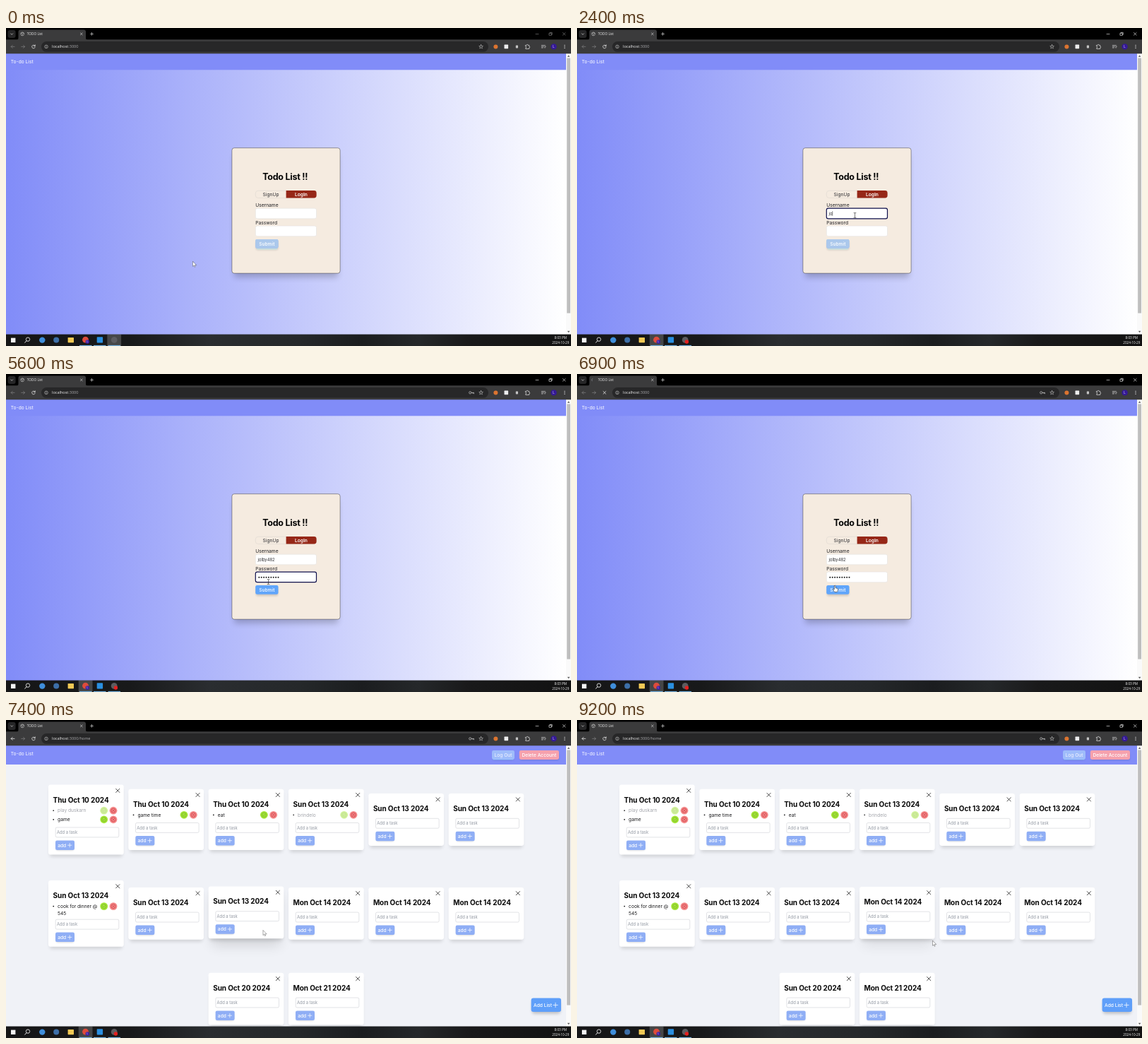
Write an HTML page that moves like this. It is 800 px wide and 450 px high and loops after 9300 ms.

```html
<!DOCTYPE html>
<html lang="en">
<head>
<meta charset="utf-8">
<title>Todo list</title>
<style>
  html, body { margin: 0; width: 100%; height: 100%; overflow: hidden; background: #000; }
  svg { display: block; width: 800px; height: 450px; }
  text { font: 400 6.67px Inter, sans-serif; white-space: pre; }
  .ui { font-family: "Open Sans", "Noto Sans", sans-serif; }
  .line { fill: none; stroke-linecap: round; stroke-linejoin: round; }
</style>
</head>
<body>
<svg id="stage" viewBox="0 0 800 450" xmlns="http://www.w3.org/2000/svg">
  <defs>
    <linearGradient id="sky"><stop stop-color="#818cf8"/><stop offset="1" stop-color="#fff"/></linearGradient>
    <linearGradient id="dock">
      <stop stop-color="#161617"/><stop offset=".22" stop-color="#18191a"/>
      <stop offset=".36" stop-color="#2a2d30"/><stop offset=".52" stop-color="#25282a"/>
      <stop offset=".63" stop-color="#1b1d1f"/><stop offset=".73" stop-color="#25282a"/>
      <stop offset=".82" stop-color="#19191a"/><stop offset="1" stop-color="#121212"/>
    </linearGradient>
  </defs>
</svg>
<script>
const LOOP = 9300, STEP = 100;
const CLICK = 900, TAB = 3700, SUBMIT = 6400, LOAD = 6500, HOME = 7000, READY = 7300;
const USER = "jolby482";
const USER_KEYS = [2200, 2400, 2500, 2700, 2800, 3000, 3200, 3300];
const PASS_KEYS = [3900, 4200, 4300, 4400, 4500, 4600, 4700, 4900, 5000];
const PATH = [
  [0, 264.5, 330.5], [100, 264.5, 330.5], [800, 393.5, 265], [4800, 393.5, 265],
  [5100, 428, 302], [5300, 424, 298], [5800, 343, 292], [6300, 365, 299.5],
  [7000, 365, 299.5], [8200, 361, 293], [9050, 495, 311], [9200, 503.5, 312.5], [LOOP, 503.5, 312.5]
];

const stage = document.getElementById("stage");

function el(tag, parent, attrs = {}, text) {
  const node = document.createElementNS("http://www.w3.org/2000/svg", tag);
  for (const k in attrs) node.setAttribute(k, attrs[k]);
  if (text !== undefined) node.textContent = text;
  parent.append(node);
  return node;
}
const group = (p, a) => el("g", p, a);
const box = (p, x, y, width, height, fill, rx = 0, more) => el("rect", p, { x, y, width, height, fill, rx, ...more });
const dot = (p, cx, cy, r, fill, more) => el("circle", p, { cx, cy, r, fill, ...more });
const line = (p, d, stroke, w = 0.7, more) => el("path", p, { d, stroke, "stroke-width": w, class: "line", ...more });
const cross = (p, x, y, r, c, w) => line(p, `M${x - r} ${y - r}l${2 * r} ${2 * r}m0 ${-2 * r}l${-2 * r} ${2 * r}`, c, w);
const plus = (p, x, y, r, c, w) => line(p, `M${x - r} ${y}h${2 * r}M${x} ${y - r}v${2 * r}`, c, w);
const label = (p, x, y, s, fill, css = "", more) => el("text", p, { x, y, fill, style: css, ...more }, s);
const centred = (p, x, y, s, fill, css) => label(p, x, y, s, fill, css, { "text-anchor": "middle" });
const blurred = (p, x, y, w, h, blur, alpha, rx = 3) =>
  box(p, x, y, w, h, "#000", rx, { style: `filter:blur(${blur}px)`, opacity: alpha });
const show = (node, on) => { node.style.display = on ? "" : "none"; };

// Login page
const login = group(stage);
box(login, 0, 36, 793, 398, "url(#sky)");
box(login, 0, 36, 793, 23.3, "#818cf8");
blurred(login, 323, 180, 147, 173, 4, 0.2);
box(login, 319.9, 169.7, 153.2, 177.4, "#f5ebe0", 3.4, { stroke: "#3c3a3c", "stroke-width": 0.5 });
centred(login, 395.2, 215.3, "Todo List !!", "#050505", "font-size:12.5px;font-weight:700;letter-spacing:-.02em");
box(login, 353.2, 230.2, 86.4, 10.3, "#f5ebe0", 4, { stroke: "#d8d2cc", "stroke-width": 0.5 });
el("path", login, { d: "M396.6 230h39.6a3.4 3.4 0 0 1 3.4 3.4v3.6a3.4 3.4 0 0 1-3.4 3.4h-39.6z", fill: "#962717" });
centred(login, 375, 237.6, "SignUp", "#2c2c30");
centred(login, 418, 237.6, "LogIn", "#fff", "font-weight:600");
label(login, 353.2, 252.8, "Username", "#1f1f22");
label(login, 353.2, 277.7, "Password", "#1f1f22");

function field(y) {
  const g = group(login);
  box(g, 353.3, y, 86.2, 14.6, "#fff", 2.5, { stroke: "#dedcda", "stroke-width": 0.5 });
  const ring = box(g, 353.3, y, 86.2, 14.6, "#fff", 2.4, { stroke: "#10104c", "stroke-width": 1.2 });
  return { g, ring };
}
const userField = field(255.2), passField = field(280.1);
const userText = label(login, 356.6, 264.5, "", "#2a2a2e", "font-size:5.83px");
const bullets = PASS_KEYS.map((_, i) => dot(login, 358.3 + i * 3.4, 287.8, 1, "#151515"));
const caret = box(login, 0, 0, 0.5, 6.6, "#000");
const submit = group(login);
blurred(submit, 354, 302, 31, 12, 1.5, 0.16, 2);
box(submit, 353.2, 299, 32.3, 12.8, "#60a5fa", 2.2);
const submitVeil = box(login, 353.2, 299, 32.3, 12.8, "#f5ebe0", 2.2);
const submitGlow = box(login, 355, 312.2, 29, 1.2, "#c5e6e8", 0.6);
centred(login, 369.3, 307.7, "Submit", "#fff", "font-weight:500");

// Home page
const home = group(stage);
box(home, 0, 36, 793, 398, "#f0f2f7");
box(home, 0, 36, 793, 27, "#818cf8");

function actions(x, w, x2, css) {
  const g = group(home);
  blurred(g, x + 1, 46, w - 2, 11, 1, 0.12, 2);
  box(g, x, 43, w, 13, "#9fbcfa", 2.4);
  line(g, `M${x + 2} 56h${w - 4}`, "#8fd0ff", 0.6);
  centred(g, x + w / 2, 51.8, "Log Out", "#e8ecfd", css);
  blurred(g, x2 + 1, 46, 782 - x2, 11, 1, 0.12, 2);
  box(g, x2, 43, 783 - x2, 13, "#f6a1ad", 2.4);
  centred(g, (x2 + 783) / 2, 51.8, "Delete Account", "#fff", css);
  return g;
}
const FALLBACK = "font-family:'Liberation Sans',Arial,sans-serif;font-weight:700";
const early = actions(689.5, 32, 728, FALLBACK);
const late = actions(688, 32, 726.8, "font-weight:500");

const cardLayer = group(home);
const cards = [];

function mark(g, x, y, color, ink, done) {
  const m = group(g, { opacity: done ? 0.5 : 1 });
  dot(m, x, y, 5.4, color);
  dot(m, x, y, 3.1, "none", { stroke: ink, "stroke-width": 0.6 });
  return m;
}

function card(col, top, title, tasks = []) {
  const x = 60 + col * 113.33, w = 106.7;
  const lines = tasks.map(t => t.text.split("\n").length);
  const extra = lines.reduce((sum, n) => sum + (n > 1 ? 20 : 12.6), 0);
  const h = 73.8 + extra;
  const g = group(cardLayer);
  blurred(g, x + 2, top + 5, w - 4, h - 2, 2.5, 0.13);
  const lifted = blurred(g, x + 5, top + 15, w - 10, h - 5, 9, 0.3);
  box(g, x, top, w, h, "#fff", 3.4);
  cross(g, x + 98.2, top + 8.3, 2.6, "#111", 0.75);
  label(g, x + 6.6, top + 24.9, title, "#080808", "font-size:10px;font-weight:700;letter-spacing:-.01em");
  let y = top + 36.6;
  tasks.forEach((t, i) => {
    dot(g, x + 7.2, y, 0.9, t.done ? "#333" : "#111");
    t.text.split("\n").forEach((s, n) => label(g, x + 13.1, y + 2.2 + n * 10, s, t.done ? "#a3a5ab" : "#1a1a1c"));
    const ok = mark(g, x + 78.7, y, "#a3e635", "#6fa32a", t.done);
    line(ok, `M${x + 77.3} ${y}l1 1.1 2-2.1`, "#6fa32a", 0.6);
    const del = mark(g, x + 92, y, "#f48a8a", "#c42b34");
    cross(del, x + 92, y, 1.2, "#c42b34", 0.6);
    y += lines[i] > 1 ? 20 : 12.6;
  });
  const b = top + extra;
  box(g, x + 10.2, b + 35.2, 89.6, 13.9, "#fff", 1.8, { stroke: "#c4c7cd", "stroke-width": 0.5 });
  label(g, x + 11.9, b + 44.2, "Add a task", "#9298a2", "font-size:5.83px");
  blurred(g, x + 11, b + 56, 25, 12, 1, 0.14, 2);
  box(g, x + 10, b + 53.6, 27, 13.5, "#8faef5", 2.2);
  label(g, x + 13.2, b + 62.7, "add", "#fff", "font-weight:500");
  plus(g, x + 30.2, b + 60.4, 2.7, "#fff", 0.7);
  cards.push({ g, lifted, x, top, w, h });
}

card(0, 91.6, "Thu Oct 10 2024", [{ text: "play duskarn", done: true }, { text: "game" }]);
card(1, 97.7, "Thu Oct 10 2024", [{ text: "game time" }]);
card(2, 97.7, "Thu Oct 10 2024", [{ text: "eat" }]);
card(3, 97.7, "Sun Oct 13 2024", [{ text: "brindelo", done: true }]);
card(4, 104.1, "Sun Oct 13 2024");
card(5, 104.1, "Sun Oct 13 2024");
card(0, 227, "Sun Oct 13 2024", [{ text: "cook for dinner @\n545" }]);
["Sun Oct 13 2024", "Sun Oct 13 2024", "Mon Oct 14 2024", "Mon Oct 14 2024", "Mon Oct 14 2024"]
  .forEach((title, i) => card(i + 1, 236.9, title));
card(2, 357.8, "Sun Oct 20 2024");
card(3, 357.8, "Mon Oct 21 2024");

blurred(home, 745, 398, 39.5, 17.5, 2, 0.22);
box(home, 743.6, 393.6, 42.4, 19.4, "#5f9ff9", 3);
label(home, 747, 405.7, "Add List", "#fff", "font-weight:500");
plus(home, 778, 403.4, 3.2, "#fff", 0.75);

label(stage, 6.8, 50.2, "To-do List", "#fff");

// Scrollbar
box(stage, 793, 36, 7, 398, "#fafafa");
box(stage, 794.2, 42.5, 4.8, 361, "#bebebe");
el("path", stage, { d: "M794.8 40.8l1.8-2.2 1.8 2.2zM794.8 428.7l1.8 2.2 1.8-2.2z", fill: "#555" });

// Browser frame
const GREY = "#c8c8c8";
box(stage, 0, 0, 800, 16.5, "#000");
box(stage, 0, 16.3, 800, 20, "#3b3b3c");
box(stage, 2.6, 3, 11, 11, "#262627", 3);
line(stage, "M6.7 7.9l1.5 1.5 1.5-1.5", "#e4e4e4", 0.7);
el("path", stage, { d: "M14.5 17q3 0 3-3V5.5q0-3 3-3H110q3 0 3 3V14q0 3 3 3z", fill: "#3b3b3c" });
const globe = group(stage);
dot(globe, 23.2, 8.4, 2.4, "none", { stroke: GREY, "stroke-width": 0.6 });
line(globe, "M21.2 7.4l1.8.6.4 1.4-1 1.2M23.2 6.2l1 1.2 1.2.2", GREY, 0.6);
const spinner = line(stage, "M23.2 6a2.4 2.4 0 0 1 2.4 2.4", "#8f9499", 0.6);
const tabTitle = label(stage, 29.8, 10.3, "", "#f0f0f0", "font-size:4.75px", { class: "ui" });
cross(stage, 106.8, 8.4, 1.4, "#e4e4e4", 0.6);
plus(stage, 121.5, 8.4, 2, "#e4e4e4", 0.65);
const controls = group(stage);
line(controls, "M750 8.6h4", "#fff", 0.6);
line(controls, "M769.3 7.3h3v3h-3zM770.2 7.2v-.9h3v3h-.8", "#fff", 0.6);
cross(controls, 790.2, 8.4, 1.9, "#fff", 0.6);

const back = line(stage, "M12 26.4H7.2m2-2l-2 2 2 2", "#fff", 0.75);
line(stage, "M21.8 26.4h4.8m-2-2l2 2-2 2", "#7c7c7e", 0.75);
const reload = line(stage, "M41 25.3a2.3 2.3 0 1 0 .2 1.9M41.2 23.8v1.7h-1.7", "#eee", 0.75);
const stop = cross(stage, 39, 26.4, 1.9, "#eee", 0.75);
box(stage, 50, 19, 633, 14.8, "#272728", 7.4);
dot(stage, 57, 26.4, 2.3, "none", { stroke: GREY, "stroke-width": 0.6 });
line(stage, "M57 26.2v1.3M57 25.1v.1", GREY, 0.6);
const url = label(stage, 65, 28.4, "", "#f2f2f2", "font-size:5.55px", { class: "ui" });
el("tspan", url, {}, "localhost");
const urlRest = el("tspan", url, { fill: "#a9a9ab" });
const key = group(stage);
dot(key, 657.2, 26.4, 1.6, "none", { stroke: GREY, "stroke-width": 0.7 });
line(key, "M658.9 26.4h3.6v1.4M661 26.4v1.2", GREY, 0.7);
const star = Array.from({ length: 10 }, (_, i) => {
  const a = i * Math.PI / 5, r = i % 2 ? 1.3 : 3;
  return `${672.6 + r * Math.sin(a)} ${26.5 - r * Math.cos(a)}`;
});
line(stage, `M${star.join("L")}z`, GREY, 0.55);
dot(stage, 693.4, 26.4, 3, "#dc7430");
box(stage, 705.5, 23.6, 5.6, 5.6, "#ededed", 0.6);
box(stage, 721.8, 24.4, 3.2, 4, "#c4c4c4", 0.6);
line(stage, "M735.8 24.4h1.5a1 1 0 0 1 2 0h1.4v1.6a1 1 0 0 1 0 2v1.5h-4.9v-1.6a1 1 0 0 0 0-2z", "#e4e4e4", 0.7);
line(stage, "M758.3 24.6h5M758.3 26.3h3M758.3 28h2M763 28.2v-2h1.3", "#e4e4e4", 0.65);
dot(stage, 775.6, 26.4, 4.2, "#351a96");
centred(stage, 775.6, 28, "L", "#e6defc", "font-size:4.4px");
[24.4, 26.4, 28.4].forEach(y => dot(stage, 791, y, 0.55, "#eee"));

// Taskbar
box(stage, 0, 433.5, 800, 16.5, "url(#dock)");
const slot = box(stage, 0, 433.5, 19.8, 16.5, "#fff", 0, { opacity: 0.2 });
box(stage, 7, 438.6, 6.4, 6.4, "#f4f4f4");
dot(stage, 31, 440.6, 2.7, "none", { stroke: "#fff", "stroke-width": 0.8 });
line(stage, "M29 442.7l-2.3 2.5", "#fff", 0.9);
dot(stage, 51.3, 441.6, 4.2, "#3f8edb");
dot(stage, 71.2, 441.6, 4, "#3d6fa8");
box(stage, 87.6, 438, 8.4, 7.2, "#f3c955", 0.6);
dot(stage, 112.5, 441.2, 4.4, "#dd4b3c");
dot(stage, 115.3, 444, 2.7, "#3c1fa5");
centred(stage, 115.3, 445.2, "L", "#fff", "font-size:3.2px");
box(stage, 128.7, 437.2, 8.4, 8.4, "#2a8fe0", 0.8);
dot(stage, 153.2, 441.4, 4.4, "#5c5c60");
const rec = dot(stage, 155.4, 444, 2.7, "#e3201f");
[104, 124, 144.5].forEach(x => box(stage, x, 448.9, 17.5, 1.1, "#78b5e4"));
centred(stage, 785.3, 439.7, "8:03 PM", "#f4f4f4", "font-size:4.7px").setAttribute("class", "ui");
centred(stage, 785.3, 447.2, "2024-10-29", "#f4f4f4", "font-size:4.6px").setAttribute("class", "ui");

// Pointers, hotspot at 0,0
const pointer = group(stage);
const shapes = {
  arrow: line(pointer, "M0 0v6.8l1.6-1.4 1 2.4 1.1-.5-1-2.3h2.1z", "#555", 0.5, { style: "fill:#fff" }),
  beam: line(pointer, "M-1.4-3.4h1l.4.4.4-.4h1M0-3v6M-1.4 3.4h1L0 3l.4.4h1", "#222", 0.6),
  hand: line(pointer, "M-.4 0q.9-.8 1.4.2v3l2.8.8q.8.3.6 1.4l-.5 2.6q-.2 1-1.2 1H.3q-.7 0-1.1-.8l-1.8-3q.3-1 1.3-.4l.6.7V.4z", "#222", 0.55, { style: "fill:#fff" })
};

function cursorAt(t) {
  const i = PATH.findIndex(p => p[0] > t);
  const [t0, x0, y0] = PATH[i - 1], [t1, x1, y1] = PATH[i];
  const u = (t - t0) / (t1 - t0), k = u * u * (3 - 2 * u);
  return [x0 + (x1 - x0) * k, y0 + (y1 - y0) * k];
}
const inside = ([px, py], x, y, w, h) => px >= x && px <= x + w && py >= y && py <= y + h;

function shapeAt(t, c) {
  if (t >= HOME) return "arrow";
  if (inside(c, 353, 255, 87, 15) || inside(c, 353, 280, 87, 15)) return "beam";
  return inside(c, 353, 299, 33, 13) || inside(c, 353, 230, 87, 11) ? "hand" : "arrow";
}

// Share of the last 300 ms spent over a card gives the transition level
function lift(c, t) {
  let n = 0;
  for (let d = 0; d < 300; d += 20) {
    const s = t - d;
    if (s >= READY && inside(cursorAt(s), c.x, c.top, c.w, c.h)) n++;
  }
  return n / 15;
}

const typed = (keys, t) => keys.filter(k => k <= t).length;

function drawLogin(t) {
  const n = typed(USER_KEYS, t), m = typed(PASS_KEYS, t);
  const focus = t < CLICK || t >= SUBMIT ? "" : t < TAB ? "user" : "pass";
  userText.textContent = USER.slice(0, n);
  bullets.forEach((b, i) => show(b, i < m));
  show(userField.ring, focus === "user");
  show(passField.ring, focus === "pass");
  const last = Math.max(CLICK, ...[...USER_KEYS, TAB, ...PASS_KEYS].filter(k => k <= t));
  show(caret, focus && (t - last) % 1000 < 500);
  const end = focus === "user" ? (n ? userText.getComputedTextLength() : 0) : m * 3.4;
  caret.setAttribute("x", 356.7 + end);
  caret.setAttribute("y", focus === "user" ? 259.2 : 284.2);
  const off = 1 - Math.min(1, Math.max(0, (t - PASS_KEYS[0] + 50) / 150));
  submitVeil.setAttribute("opacity", off * 0.5);
  submitGlow.setAttribute("opacity", off);
}

function drawHome(t) {
  const ready = t >= READY;
  show(early, !ready);
  show(late, ready);
  show(cardLayer, ready);
  if (!ready) return;
  for (const c of cards) {
    const k = lift(c, t);
    c.g.setAttribute("transform", `translate(0 ${-3.4 * k})`);
    c.lifted.setAttribute("opacity", 0.3 * k);
  }
}

function draw(t) {
  const atHome = t >= HOME, active = t >= CLICK, loading = t >= LOAD && t < READY;
  show(login, !atHome);
  show(home, atHome);
  if (atHome) drawHome(t); else drawLogin(t);

  const spin = loading && !atHome;
  show(globe, !spin);
  show(spinner, spin);
  spinner.setAttribute("transform", `rotate(${t * 0.36 - 90} 23.2 8.4)`);
  tabTitle.textContent = atHome && loading ? "localhost:3000/home" : "TODO List";
  urlRest.textContent = atHome ? ":3000/home" : ":3000";
  show(reload, !loading);
  show(stop, loading);
  show(key, t >= 4100);
  back.setAttribute("stroke", atHome ? "#eee" : "#7c7c7e");
  controls.setAttribute("opacity", active ? 1 : 0.55);
  slot.setAttribute("x", active ? 102.7 : 143.3);
  show(rec, t >= 100);

  const c = cursorAt(t), shape = shapeAt(t, c);
  pointer.setAttribute("transform", `translate(${c})`);
  for (const name in shapes) show(shapes[name], name === shape);
}

function tick() {
  const t = performance.now() % LOOP;
  draw(Math.floor(t / STEP) * STEP);
  requestAnimationFrame(tick);
}
tick();
</script>
</body>
</html>
```
